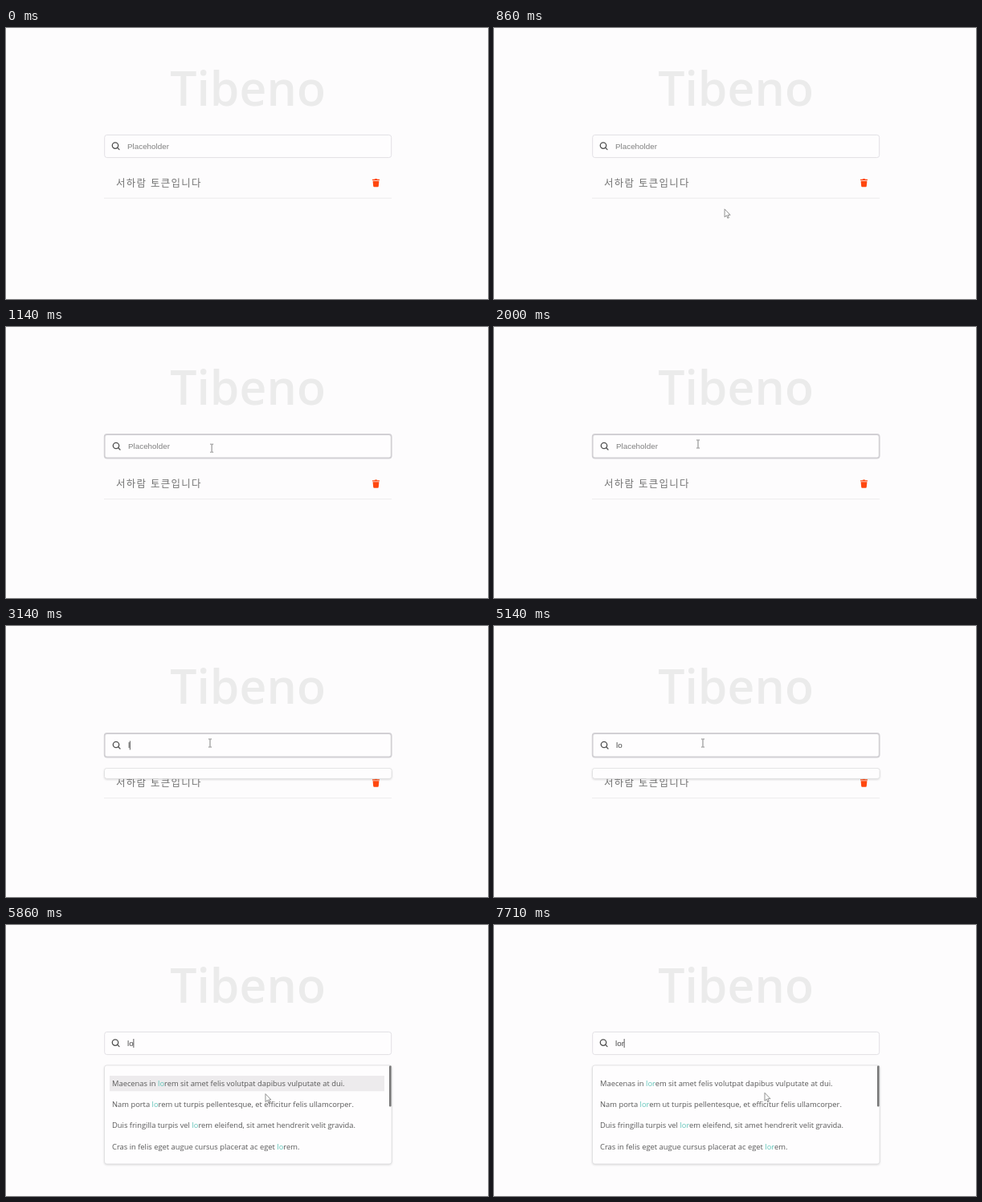
An HTML page for the animation above (8000 ms loop, 600 px wide and 338 px high).

```html
<!DOCTYPE html>
<html lang="ko">
<head>
<meta charset="utf-8">
<title>Todo search</title>
<style>
  html, body { margin: 0; height: 100%; overflow: hidden; background: #fdfcfd; }
  svg { display: block; width: 100%; height: 100%; }
  .title { font: 600 58.9px "Open Sans", sans-serif; fill: #ebebeb; text-anchor: middle; }
  .todo { font: 12.5px "Noto Sans CJK KR", "Noto Sans CJK", sans-serif; letter-spacing: 1.25px; fill: #747474; }
  .input { font: 9.85px "Liberation Sans", Arial, sans-serif; fill: #4a4a4a; }
  .input.empty { fill: #808080; }
  .results { font: 9.37px "Open Sans", sans-serif; fill: #595959; }
  .results tspan { fill: #5fc4b8; }
  .box { fill: #fefdfe; stroke: #dfdde3; stroke-width: .9; }
  .box.hover { stroke: #d2d0d4; stroke-width: 1.8; }
  .panel { fill: #fefdfe; stroke: #dcdcde; stroke-width: .8; filter: drop-shadow(0 1px 1px #0002); }
</style>
</head>
<body>
<svg viewBox="0 0 600 338">
  <text class="title" x="301" y="96.5">Tibeno</text>

  <g id="item">
    <rect id="itemBg" x="122" y="174.5" width="358" height="38" rx="2" fill="#ebeaeb"/>
    <path d="M122 212.2H480" stroke="#ebeaeb" stroke-width=".9"/>
    <g id="itemBody">
      <text class="todo" x="137" y="197.6">서하람 토큰입니다</text>
      <path fill="#ff470f" d="M456 188.8H458.6L459.3 188H461.7L462.4 188.8H465V190H456Z
        M456.6 190.8H464.4L463.8 197.2Q463.7 198.2 462.7 198.2H458.3Q457.3 198.2 457.2 197.2Z"/>
    </g>
  </g>

  <rect id="box" x="122.7" width="357" rx="3"/>
  <g id="field">
    <g fill="none" stroke="#505050" stroke-width="1.3" stroke-linecap="round">
      <circle cx="136" cy="146.6" r="3.7"/><path d="M138.8 149.4L141 151.6"/>
    </g>
    <text id="query" x="151" y="151"></text>
    <path id="caret" d="M0 142V153" stroke="#333" stroke-width=".8"/>
  </g>

  <rect id="panel" class="panel" x="122.5" width="357.6" rx="3"/>
  <g id="list">
    <rect id="rowBg" x="129" y="188" width="342" height="19.3" fill="#e9e8e9"/>
    <g id="results" class="results"></g>
    <rect x="477" y="175.6" width="2.6" height="51" rx="1" fill="#777"/>
  </g>

  <g id="pointer">
    <path id="arrow" d="M0 0V10L2.4 7.9L3.8 11.4L5.3 10.7L3.9 7.4H7Z" fill="#fff" stroke="#777" stroke-width=".8"/>
    <path id="beam" d="M-2 -5H-.6L0 -4.5L.6 -5H2M0 -4.5V4.5M-2 5H-.6L0 4.5L.6 5H2" fill="none" stroke="#777" stroke-width=".9"/>
  </g>
</svg>
<script>
const LOOP = 8000, TICK = 1000 / 7, BLINK = 530;
const ENTER = 714, CLICK = 1440;
const keys = [{ time: 3100, char: "l" }, { time: 3440, char: "o" }, { time: 7600, char: "r" }];
const lines = [
  "Maecenas in lorem sit amet felis volutpat dapibus vulputate at dui.",
  "Nam porta lorem ut turpis pellentesque, et efficitur felis ullamcorper.",
  "Duis fringilla turpis vel lorem eleifend, sit amet hendrerit velit gravida.",
  "Cras in felis eget augue cursus placerat ac eget lorem."];

const $ = id => document.getElementById(id);
const clamp = v => Math.min(1, Math.max(0, v));
const smooth = p => p * p * (3 - 2 * p);
const easeOut = p => 1 - (1 - p) ** 2.5;
const show = (id, opacity) => $(id).setAttribute("opacity", Number(opacity));
const move = (id, x, y) => set(id, { transform: `translate(${x} ${y})` });
function set(id, attrs) {
  for (const name in attrs) $(id).setAttribute(name, attrs[name]);
}

// The pointer enters from below, rests in the input, then goes down to the list.
function pointerAt(t) {
  const glide = (start, end, ease) => ease(clamp((t - start) / (end - start)));
  const enter = glide(ENTER, 1286, easeOut);
  const nudge = glide(5000, 5143, smooth);
  const leave = glide(5143, 5857, smooth);
  const settle = glide(5857, 6143, smooth);
  return {
    x: 322 - 68 * enter + 6 * nudge + 63 * leave + 14 * settle,
    y: 310 - 164 * enter + 64.6 * leave - 1.3 * settle
  };
}

function setQuery(query) {
  set("query", { class: query ? "input" : "input empty" });
  $("query").textContent = query || "Placeholder";
  $("results").innerHTML = lines.map((line, i) =>
    `<text x="132" y="${201 + i * 26.2}">${line.replace(query, `<tspan>${query}</tspan>`)}</text>`
  ).join("");
}

function draw(t) {
  const { x, y } = pointerAt(t);
  const hover = y < 164;
  const pressed = keys.filter(key => key.time <= t);
  const query = pressed.map(key => key.char).join("");
  const open = query && !hover;
  const overItem = !query && y > 174 && y < 213;

  move("item", 0, hover ? 2.5 : 0);
  show("itemBg", overItem);
  show("itemBody", overItem ? .85 : 1);

  set("box", { class: hover ? "box hover" : "box", y: hover ? 134 : 133.4, height: hover ? 29.5 : 28.2 });
  move("field", hover ? 1 : 0, hover ? 1.4 : 0);
  setQuery(query);

  const lastInput = pressed.length ? pressed.at(-1).time : CLICK;
  show("caret", t >= CLICK && Math.floor((t - lastInput) / BLINK) % 2 === 0);
  move("caret", 151.2 + (query ? $("query").getComputedTextLength() : 0), 0);

  set("panel", open ? { y: 175, height: 123 } : { y: 177.4, height: 13 });
  show("panel", query !== "");
  show("list", Boolean(open));
  show("rowBg", y > 186 ? clamp((6100 - t) / 300) : 0);

  show("pointer", t >= ENTER);
  move("pointer", x, y);
  show("beam", hover);
  show("arrow", !hover);
}

// The picture advances in ticks, seven per second.
let lastTick;
function frame(now) {
  const tick = Math.floor((now % LOOP + 5) / TICK);
  if (tick !== lastTick) draw(tick * TICK);
  lastTick = tick;
  requestAnimationFrame(frame);
}
frame(performance.now());
</script>
</body>
</html>
```
